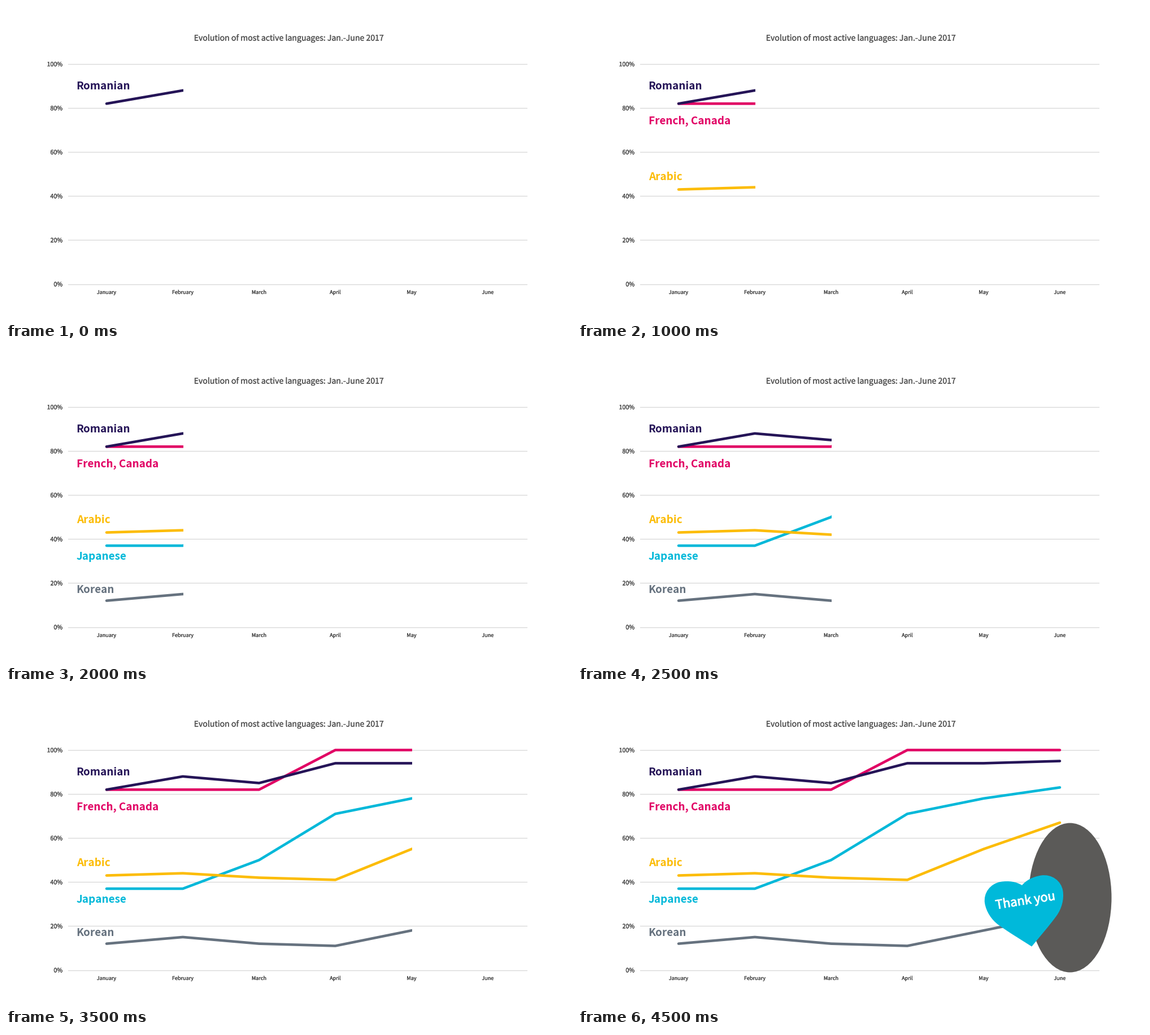
Recreate the animation shown at these times as a matplotlib script. Size 1002 by 559 pixels, loop 5000 ms.

```python
import matplotlib.pyplot as plt
from matplotlib.animation import FuncAnimation
from matplotlib.patches import Ellipse, PathPatch, Rectangle
from matplotlib.path import Path
from matplotlib.patheffects import withStroke
from matplotlib.transforms import Affine2D

W, H = 1002, 559
DPI = 64
PT = 72 / DPI  # points per pixel
FRAMES, STEP_MS = 10, 500
TILT = 9  # degrees, heart and its words

plt.rcParams["font.family"] = ["Noto Sans CJK JP", "DejaVu Sans"]

MONTHS = ["January", "February", "March", "April", "May", "June"]
MONTH_X = [178 + 135 * i for i in range(len(MONTHS))]

# name, colour, monthly percentages, label baseline; in order of appearance
SERIES = [
    ("Romanian", "#251457", [82, 88, 85, 94, 94, 95], 148),
    ("French, Canada", "#e10064", [82, 82, 82, 100, 100, 100], 209.5),
    ("Arabic", "#fcbc05", [43, 44, 42, 41, 55, 67], 309),
    ("Japanese", "#00b8d9", [37, 37, 50, 71, 78, 83], 374.5),
    ("Korean", "#66727f", [12, 15, 12, 11, 18, 25], 433),
]


def value_y(percent):
    return 493.5 - 3.905 * percent


fig = plt.figure(figsize=(W / DPI, H / DPI), dpi=DPI, facecolor="white")
ax = fig.add_axes([0, 0, 1, 1])
ax.set_xlim(0, W)
ax.set_ylim(H, 0)
ax.axis("off")


def label(x, y, text, px, color, stroke=0.0, **kw):
    """Text on a baseline; a thin stroke makes it slightly heavier."""
    effects = [withStroke(linewidth=stroke * PT, foreground=color)]
    return ax.text(x, y, text, fontsize=px * PT, color=color, va="baseline",
                   path_effects=effects if stroke else None, **kw)


def draw_axes():
    label(500.5, 61.5, "Evolution of most active languages: Jan.-June 2017",
          14.1, "#555555", 0.3, ha="center")
    for percent in range(0, 101, 20):
        y = value_y(percent)
        ax.plot([110, 922], [y, y], color="#d6d6d6", lw=1.2 * PT, zorder=1)
        label(100, y + 4, f"{percent}%", 10.7, "#404040", 0.2, ha="right")
    for x, month in zip(MONTH_X, MONTHS):
        label(x, 511, month, 9.05, "#404040", 0.2, ha="center")


def draw_series(order, name, color, values, baseline):
    line, = ax.plot(MONTH_X, [value_y(v) for v in values], color=color,
                    lw=4.6 * PT, solid_capstyle="round",
                    solid_joinstyle="round", zorder=7 - order)
    text = label(124.7, baseline, name, 18.9, color, weight="bold", zorder=7)
    return line, text


def draw_heart(x, y):
    """Heart with its notch at (x, y): one half, mirrored."""
    half = [(0, 0), (9, -8), (22, -12), (36, -12), (55, -12), (70, 3),
            (70, 21), (70, 36), (63, 52), (52, 63), (36, 79), (18, 94),
            (0, 110)]
    outline = half + [(-u, v) for u, v in half[-2::-1]]
    codes = [Path.MOVETO] + [Path.CURVE4] * (len(outline) - 1)
    place = Affine2D().rotate_deg(-TILT).translate(x, y)
    return ax.add_patch(PathPatch(place.transform_path(Path(outline, codes)),
                                  facecolor="#00b9da", lw=0, zorder=9))


def draw_thanks():
    body = ax.add_patch(Ellipse((871, 365), 147, 265, color="#5b5a58",
                                lw=0, zorder=8))
    words = label(793, 377, "Thank you", 21.8, "white", 0.8, ha="center",
                  rotation=TILT, rotation_mode="anchor", zorder=10)
    return [body, draw_heart(786, 343), words]


draw_axes()
series = [draw_series(i, *s) for i, s in enumerate(SERIES)]
thanks = draw_thanks()


def update(frame):
    # Series enter one by one, then a month is uncovered per step
    last = len(MONTHS) - 1
    month = min(max(frame - 3, 1), last)
    reveal = MONTH_X[month] + 1.5 if month < last else W
    for i, (line, text) in enumerate(series):
        line.set_visible(frame >= i)
        text.set_visible(frame >= i)
        line.set_clip_path(Rectangle((0, H), reveal, -H,
                                     transform=ax.transData))
    for part in thanks:
        part.set_visible(frame == FRAMES - 1)
    return []


anim = FuncAnimation(fig, update, frames=FRAMES, interval=STEP_MS,
                     repeat=True, repeat_delay=0, blit=False)
plt.show()
```
